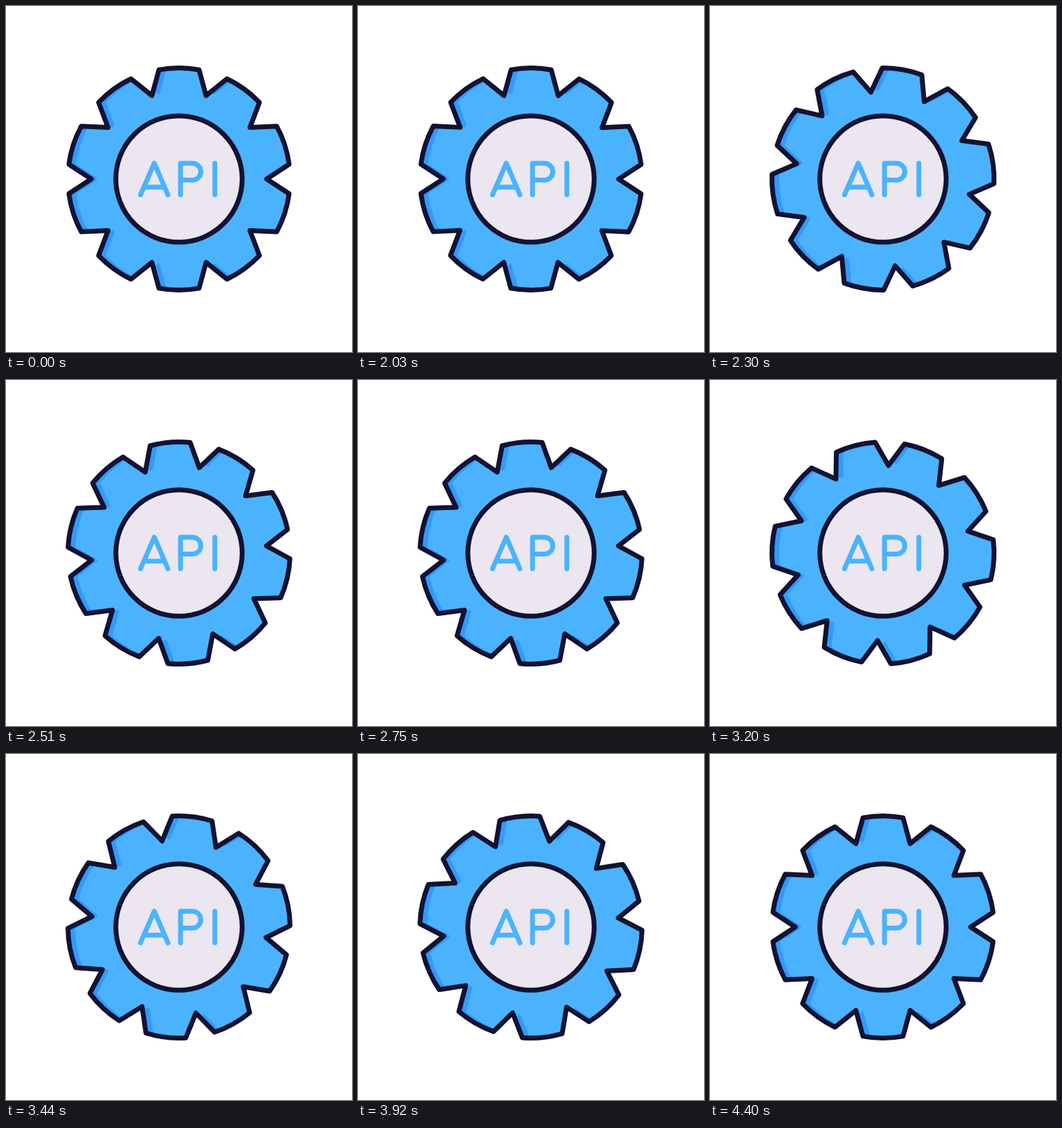
Write an HTML page that moves like this. It is 500 px wide and 500 px high and loops after 4.43 s.

```html
<!DOCTYPE html>
<html lang="en">
<head>
<meta charset="utf-8">
<title>API gear</title>
<style>
  html, body { margin: 0; width: 100%; height: 100%; overflow: hidden; background: #fff; }
  svg { display: block; width: 100%; height: 100%; }
  .line { fill: none; stroke: #121331; stroke-width: 7; stroke-linejoin: round; }
  .hub { fill: #ebe6ef; }
  .label { fill: none; stroke: #4bb3fd; stroke-width: 7; stroke-linecap: round; stroke-linejoin: round; }
</style>
</head>
<body>
<svg viewBox="-250 -250 500 500">
  <clipPath id="body"><path class="gear spin"/></clipPath>
  <path class="gear spin" fill="#3399ff"/>
  <g clip-path="url(#body)">
    <g transform="translate(10.5)"><path class="soft spin" fill="#4bb3fd"/></g>
  </g>
  <path class="gear spin line"/>
  <circle class="line hub" r="91.3"/>
  <g class="label" role="img" aria-label="API">
    <path d="M-55.7 22.8L-35.7 -22.8L-16 22.8M-50.5 11.7H-21"/>
    <path d="M2.2 22.8V-22.8H19.3a12.2 12.2 0 0 1 0 24.4H2.2"/>
    <path d="M51.8 -22.8V22.8"/>
  </g>
</svg>
<script>
const TEETH = 10, OUTER = 160.5, ROOT = 126.7, HALF = 10.4;
const LOOP = 4430, START = 2000, SPIN = 2385, STEP = 30, TURN = 180;

const polar = (r, deg) => {
  const a = deg * Math.PI / 180;
  return [r * Math.sin(a), -r * Math.cos(a)];
};
const toward = (a, b, d) => {
  const k = d / Math.hypot(b[0] - a[0], b[1] - a[1]);
  return [a[0] + (b[0] - a[0]) * k, a[1] + (b[1] - a[1]) * k];
};
const fmt = p => p.map(v => v.toFixed(2)).join(' ');

// Gear outline; `round` softens the notch tips.
function gearPath(round) {
  const pitch = 360 / TEETH;
  let d = '';
  for (let i = 0; i < TEETH; i++) {
    const mid = i * pitch;
    const left = polar(OUTER, mid - HALF), right = polar(OUTER, mid + HALF);
    const notch = polar(ROOT, mid + pitch / 2), next = polar(OUTER, mid + pitch - HALF);
    d += `${i ? 'L' : 'M'}${fmt(left)}A${OUTER} ${OUTER} 0 0 1 ${fmt(right)}`;
    d += round
      ? `L${fmt(toward(notch, right, round))}Q${fmt(notch)} ${fmt(toward(notch, next, round))}`
      : `L${fmt(notch)}`;
  }
  return d + 'Z';
}

// cubic-bezier(1/3, 0, 1/3, 1)
function ease(u) {
  let lo = 0, hi = 1;
  for (let i = 0; i < 30; i++) {
    const s = (lo + hi) / 2;
    const x = s * (1 - s) + s ** 3;
    if (x < u) lo = s; else hi = s;
  }
  return lo * lo * (3 - 2 * lo);
}

const setPath = (sel, d) =>
  document.querySelectorAll(sel).forEach(el => el.setAttribute('d', d));
setPath('.gear', gearPath(0));
setPath('.soft', gearPath(5));

const spinners = document.querySelectorAll('.spin');

function draw() {
  const t = performance.now() % LOOP;
  const held = Math.floor((t - START) / STEP) * STEP;
  const u = Math.min(1, Math.max(0, held / SPIN));
  const angle = u === 0 || u === 1 ? 0 : TURN * ease(u);
  spinners.forEach(el => el.setAttribute('transform', `rotate(${angle.toFixed(3)})`));
  requestAnimationFrame(draw);
}
draw();
</script>
</body>
</html>
```
